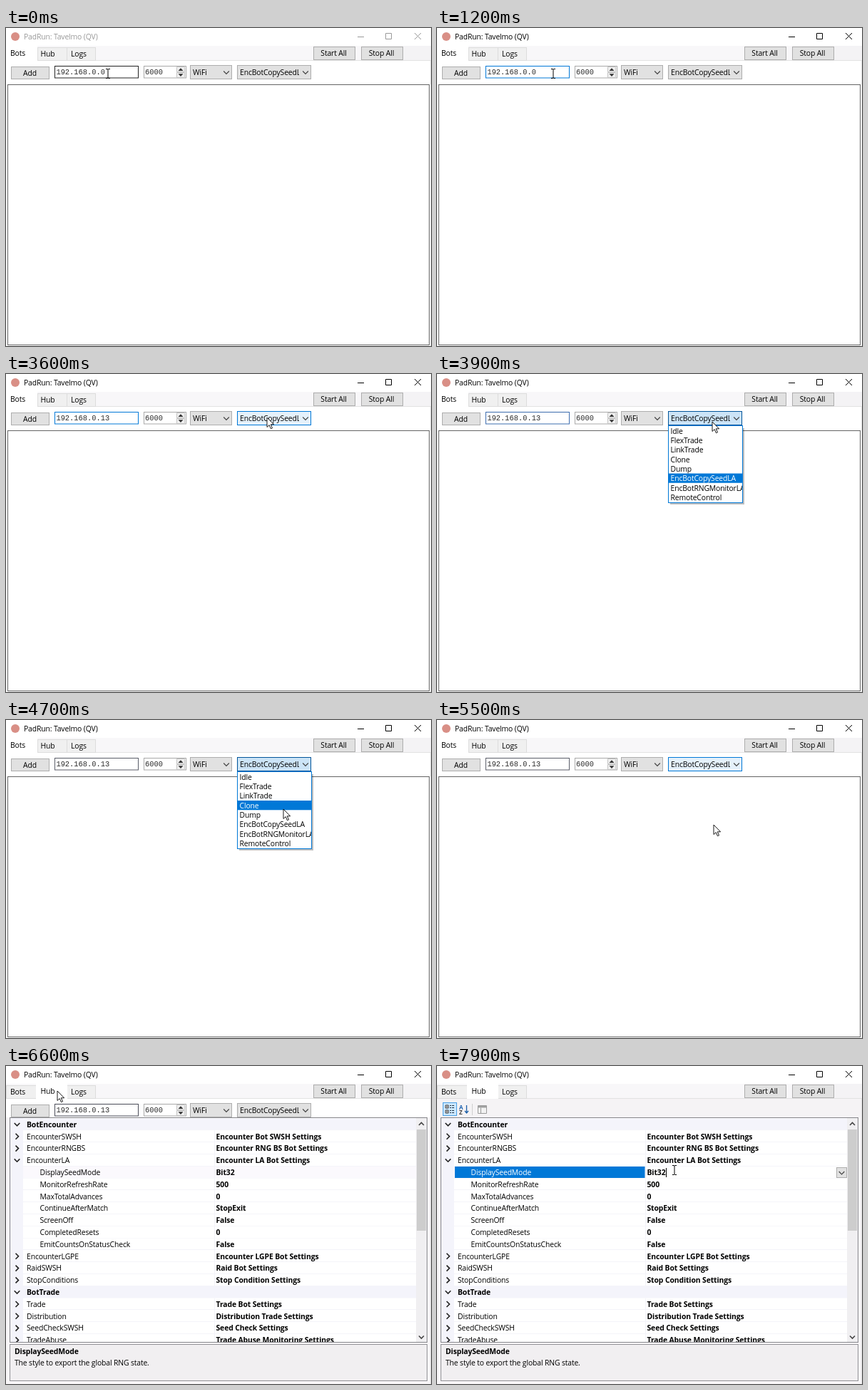
These frames come from a looping animation (596 px wide and 446 px high, 8000 ms). An HTML page:

```html
<!DOCTYPE html>
<html lang="en">
<head>
<meta charset="utf-8">
<title>Bot settings</title>
<style>
html, body { margin: 0; width: 596px; height: 446px; overflow: hidden; background: #fff; }
svg { display: block; }
text { font: 10.4px "Open Sans", "Noto Sans", sans-serif; letter-spacing: -.14px; white-space: pre; }
.b { font-weight: 700; letter-spacing: -.11px; }
.mono { font: 10.4px "Liberation Mono", monospace; letter-spacing: 0; fill: #2a2a2a; }
.mid { text-anchor: middle; }
.btn { fill: #e1e1e1; stroke: #adadad; }
.tab { fill: #f0f0f0; stroke: #dcdcdc; }
.line { fill: none; stroke: #444; stroke-width: 1.2; }
#grid use { stroke-width: 1.5; }

/* every part shares one 8 s clock; 1.25% is a tenth of a second */
.anim { animation: 8s step-end infinite; }

.title { animation-name: wake; color: #000; }
@keyframes wake {
  0% { color: #999; }
  6.25% { color: #999; animation-timing-function: steps(5, start); }
  12.5%, 100% { color: #000; }
}
.field { animation-name: field; fill: #fff; }
@keyframes field {
  0% { stroke: #222; }
  3.75% { stroke: #0078d7; }
  47.5% { stroke: #3c6cae; }
  50% { stroke: #5a5d68; }
  73.75% { stroke: #14141c; }
  77.5% { stroke: #4a4c58; }
}
.old { animation-name: old; }
@keyframes old { 0% { opacity: 1; } 20% { opacity: 0; } }
.one { animation-name: one; }
@keyframes one { 0% { opacity: 0; } 21.25% { opacity: 1; } }
.three { animation-name: three; }
@keyframes three { 0% { opacity: 0; } 25% { opacity: 1; } }
.caret { animation-name: caret; }
@keyframes caret {
  0% { opacity: 0; transform: translateX(138px); }
  3.75% { opacity: 1; transform: translateX(138px); }
  15% { opacity: 0; transform: translateX(138px); }
  20% { opacity: 1; transform: translateX(132px); }
  21.25% { opacity: 1; transform: translateX(138px); }
  25% { opacity: 1; transform: translateX(145px); }
  31.25% { opacity: 0; transform: translateX(145px); }
  37.5% { opacity: 1; transform: translateX(145px); }
  43.75% { opacity: 0; transform: translateX(145px); }
}
.combo { animation-name: combo; }
@keyframes combo {
  0% { fill: #e1e1e1; stroke: #adadad; }
  45% { fill: #e5f1fb; stroke: #0078d7; }
  47.5% { fill: #cce4f7; stroke: #005499; }
  68.75% { fill: #e5f1fb; stroke: #0078d7; }
  70% { fill: #e1e1e1; stroke: #adadad; }
}
.drop { animation-name: drop; }
@keyframes drop { 0% { opacity: 0; } 47.5% { opacity: 1; } 68.75% { opacity: 0; } }
.pick { animation-name: pick; }
@keyframes pick {
  0% { transform: translateY(66.5px); }
  52.5% { transform: none; }
  55% { transform: translateY(13.3px); }
  56.25% { transform: translateY(26.6px); }
  57.5% { transform: translateY(39.9px); }
  60% { transform: translateY(53.2px); }
  61.25% { transform: translateY(66.5px); }
}
.hubtab { animation-name: hubtab; }
@keyframes hubtab { 0% { opacity: 0; } 80% { opacity: 1; } }
.hub { animation-name: hub; }
@keyframes hub { 0% { opacity: 0; } 81.25% { opacity: 1; } }
.tools { animation-name: tools; }
@keyframes tools { 0% { opacity: 0; } 83.75% { opacity: 1; } }
.sel { animation-name: sel; }
@keyframes sel { 0% { opacity: 0; } 97.5% { opacity: 1; } }

.beam { animation-name: beam; }
@keyframes beam {
  0% { opacity: 1; }
  41.25% { opacity: 0; }
  75% { opacity: 1; }
  76.25% { opacity: 0; }
  97.5% { opacity: 1; }
}
.arrow { animation-name: arrow; }
@keyframes arrow {
  0% { opacity: 0; }
  41.25% { opacity: 1; }
  75% { opacity: 0; }
  76.25% { opacity: 1; }
  97.5% { opacity: 0; }
}
.mouse { animation-name: mouse; }
@keyframes mouse {
  0% { transform: translate(143px, 64px); }
  6.25% { transform: translate(143px, 64px); animation-timing-function: steps(5, start); }
  12.5% { transform: translate(163px, 64px); }
  17.5% { transform: translate(163px, 65px); }
  36.25% { transform: translate(164px, 66px); }
  40% { transform: translate(175px, 60px); }
  41.25% { transform: translate(208px, 45px); }
  42.5% { transform: translate(262px, 40px); }
  43.75% { transform: translate(322px, 48px); }
  45% { transform: translate(366px, 61px); }
  46.25% { transform: translate(386px, 67px); }
  52.5% { transform: translate(386px, 67px); animation-timing-function: steps(6, start); }
  60% { transform: translate(389px, 125px); animation-timing-function: steps(3, start); }
  63.75% { transform: translate(388px, 147px); }
  70% { transform: translate(372px, 132px); }
  71.25% { transform: translate(326px, 105px); }
  72.5% { transform: translate(256px, 80px); }
  73.75% { transform: translate(188px, 65px); }
  75% { transform: translate(140px, 57px); }
  76.25% { transform: translate(106px, 47px); }
  77.5% { transform: translate(84px, 39px); }
  78.75% { transform: translate(72px, 35px); }
  87.5% { transform: translate(88px, 46px); }
  88.75% { transform: translate(126px, 70px); }
  90% { transform: translate(180px, 98px); }
  91.25% { transform: translate(240px, 122px); }
  92.5% { transform: translate(290px, 138px); }
  93.75% { transform: translate(320px, 144px); }
  95% { transform: translate(331px, 146px); }
  97.5% { transform: translate(333px, 146px); }
}
</style>
</head>
<body>
<svg width="596" height="446" viewBox="0 0 596 446">
  <defs>
    <path id="down" class="line" d="M-3.8 -2 0 1.8 3.8 -2"/>
    <path id="open" class="line" style="stroke: #222; stroke-width: 1.6" d="M-3.8 -2 0 1.8 3.8 -2"/>
    <path id="shut" class="line" style="stroke: #222; stroke-width: 1.6" d="M-2 -4 2 0 -2 4"/>
    <clipPath id="name"><rect x="326" y="53" width="85" height="18"/></clipPath>
    <clipPath id="list"><rect x="325" y="73" width="103" height="107"/></clipPath>
    <clipPath id="row"><rect class="anim pick" x="325" y="73" width="103" height="13.3"/></clipPath>
    <clipPath id="pane"><rect x="5" y="72" width="587" height="315"/></clipPath>
  </defs>
  <rect width="596" height="446" fill="#fff"/>

  <!-- title bar -->
  <circle cx="13" cy="12" r="6" fill="#d98f86"/>
  <g class="anim title">
    <text x="25" y="16" fill="currentColor">PadRun: Tavelmo (QV)</text>
    <path d="M493 12.5h9M532.5 7.5h8v8h-8zM573 7l9 9M582 7l-9 9" fill="none" stroke="currentColor"/>
  </g>

  <!-- tabs -->
  <rect y="25" width="596" height="20" fill="#f8f7f9"/>
  <rect x="557" y="25" width="39" height="20" fill="#f4f3f5"/>
  <path d="M0 45.5H596" stroke="#e2e2e2"/>
  <rect class="tab" x="44.5" y="27.5" width="41" height="18"/>
  <rect class="tab" x="85.5" y="27.5" width="40" height="18"/>
  <path d="M0 25H44V46H0z" fill="#fff"/>
  <text x="6" y="39">Bots</text>
  <text x="48.5" y="40">Hub</text>
  <text x="91" y="40">Logs</text>
  <g class="anim hubtab">
    <rect y="25" width="86" height="20" fill="#f8f7f9"/>
    <rect class="tab" x="0.5" y="27.5" width="42" height="18"/>
    <path d="M42 25H86V46H42z" fill="#fff"/>
    <text x="6" y="40">Bots</text>
    <text x="48.5" y="39">Hub</text>
  </g>
  <rect class="btn" x="431.5" y="26.5" width="58" height="18"/>
  <text class="mid" x="459.5" y="39">Start All</text>
  <rect class="btn" x="498.5" y="26.5" width="58" height="18"/>
  <text class="mid" x="526.5" y="39">Stop All</text>
  <path d="M595.5 45V446" stroke="#e4e4e4"/>

  <!-- bots page -->
  <rect class="btn" x="7.5" y="54.5" width="53" height="17"/>
  <text class="mid" x="33.5" y="67">Add</text>
  <rect class="anim field" x="68.5" y="53.5" width="117" height="16.5"/>
  <text class="mono" x="70.4" y="65">192.168.0.</text>
  <text class="mono anim old" x="132.8" y="65">0</text>
  <text class="mono anim one" x="132.8" y="65">1</text>
  <text class="mono anim three" x="139" y="65">3</text>
  <rect class="anim caret" y="56" width="1" height="13"/>
  <rect x="193.5" y="53.5" width="59" height="16.5" fill="#fff" stroke="#a8a8a8"/>
  <text class="mono" x="195" y="65">6000</text>
  <path d="M239.5 54.5h11v7h-11zM239.5 62.5h11v7h-11z" fill="#f0f0f0" stroke="#c4c4c4"/>
  <path d="M241.5 60h7L245 56.3zM241.5 64.3h7L245 68z" fill="#333"/>
  <rect class="btn" x="258.5" y="52.5" width="58" height="19"/>
  <text x="262" y="66">WiFi</text>
  <use href="#down" x="309" y="62.5"/>
  <rect class="btn anim combo" x="324.5" y="52.5" width="103" height="19"/>
  <text x="328" y="66" clip-path="url(#name)">EncBotCopySeedLA</text>
  <use href="#down" x="420" y="62.5"/>
  <rect x="2.5" y="79.5" width="591" height="365" fill="#fff" stroke="#646464"/>

  <g class="anim drop">
    <path d="M327 76H431V183H327z" fill="#000" opacity=".25"/>
    <rect x="324.5" y="72.5" width="104" height="108" fill="#fff" stroke="#0078d7"/>
    <g clip-path="url(#list)"><g id="items"></g></g>
    <g clip-path="url(#row)">
      <rect x="325" y="73" width="103" height="107" fill="#0078d7"/>
      <g clip-path="url(#list)"><use href="#items" fill="#fff"/></g>
    </g>
  </g>

  <!-- hub page -->
  <g class="anim hub">
    <path d="M0 72H595V446H0z" fill="#f8f6f8"/>
    <g clip-path="url(#pane)">
      <rect x="5" y="72" width="587" height="315" fill="#fff"/>
      <rect x="6" y="73" width="18" height="314" fill="#f4f4fb"/>
      <g id="grid"></g>
      <rect x="575" y="73" width="15" height="314" fill="#f0eff1"/>
      <rect x="576" y="89" width="13" height="142" fill="#cdcdcd"/>
      <path d="M579 83l3.5-3.5L586 83M579 378.500l3.5 3.5L586 378.500" fill="none" stroke="#444" stroke-width="1.6"/>
    </g>
    <rect x="5.5" y="72.5" width="585" height="315" fill="none" stroke="#85858a"/>
    <rect x="5.5" y="390.5" width="585" height="51" fill="#f1eff1" stroke="#929296"/>
    <text class="b" x="12" y="404">DisplaySeedMode</text>
    <text x="12" y="419.5">The style to export the global RNG state.</text>
    <g class="anim sel">
      <rect x="25" y="141" width="266.5" height="16" fill="#0078d7"/>
      <text x="47.5" y="152.8" fill="#fff">DisplaySeedMode</text>
      <rect x="293" y="141" width="282" height="16" fill="#fff"/>
      <text class="b" x="294.5" y="152.8">Bit32</text>
      <path d="M321.5 143V156" stroke="#000"/>
      <rect class="btn" x="560.5" y="142.5" width="14" height="14"/>
      <use href="#down" x="567.5" y="150"/>
    </g>
  </g>
  <g class="anim tools">
    <rect y="46" width="595" height="26" fill="#f5f3f5"/>
    <rect x="8.5" y="51.5" width="19" height="18" fill="#cce8ff" stroke="#4aa0e6"/>
    <path d="M12 55h4v4h-4zM12 62h4v4h-4z" fill="#fff" stroke="#333"/>
    <path d="M13 57h2M13 64h2" stroke="#222"/>
    <path d="M18 55.5h2M21 55.5h3M18 58.5h2M21 58.5h3M18 62.5h2M21 62.5h3M18 65.5h2M21 65.5h3" stroke="#234"/>
    <text class="b" x="31" y="60.5" style="font-size: 8px" fill="#1c62b0">A</text>
    <text class="b" x="31" y="68" style="font-size: 8px" fill="#444">Z</text>
    <path d="M41.5 55V66M39 63l2.5 3L44 63" fill="none" stroke="#1c5fa8" stroke-width="1.3"/>
    <path d="M49.5 53V69" stroke="#cfcfcf"/>
    <path d="M57.5 55.5h12v11h-12zM61.5 58.5v8" fill="#f2f2f2" stroke="#9a9a9a"/>
    <path d="M58 57h11" stroke="#a0a0a0" stroke-width="3"/>
    <path d="M5 72.5H591" stroke="#85858a"/>
  </g>

  <!-- pointer -->
  <g class="anim mouse">
    <path class="anim beam" d="M-3 -6.5h2.3l.7 .7 .7-.7h2.3M0 -6V6M-3 6.5h2.3l.7-.7 .7 .7h2.3" fill="none" stroke="#000"/>
    <path class="anim arrow" d="M0 0V13.5L3.2 10.6 5.4 15.7 7.5 14.8 5.3 9.8H9.6z" fill="#fff" stroke="#000" stroke-width=".9"/>
  </g>
</svg>
<script>
const byId = id => document.getElementById(id);
const label = (x, y, s, cls = "") => `<text class="${cls}" x="${x}" y="${y}">${s}</text>`;

byId("items").innerHTML =
  ["Idle", "FlexTrade", "LinkTrade", "Clone", "Dump", "EncBotCopySeedLA", "EncBotRNGMonitorLA", "RemoteControl"]
    .map((s, i) => label(327.5, 83.7 + i * 13.3, s)).join("");

// "#" category, ">" closed group, "v" open group, "-" plain setting
const rows = [
  "#BotEncounter",
  ">EncounterSWSH|Encounter Bot SWSH Settings",
  ">EncounterRNGBS|Encounter RNG BS Bot Settings",
  "vEncounterLA|Encounter LA Bot Settings",
  "-DisplaySeedMode|Bit32",
  "-MonitorRefreshRate|500",
  "-MaxTotalAdvances|0",
  "-ContinueAfterMatch|StopExit",
  "-ScreenOff|False",
  "-CompletedResets|0",
  "-EmitCountsOnStatusCheck|False",
  ">EncounterLGPE|Encounter LGPE Bot Settings",
  ">RaidSWSH|Raid Bot Settings",
  ">StopConditions|Stop Condition Settings",
  "#BotTrade",
  ">Trade|Trade Bot Settings",
  ">Distribution|Distribution Trade Settings",
  ">SeedCheckSWSH|Seed Check Settings",
  ">TradeAbuse|Trade Abuse Monitoring Settings"
];
const pitch = 16.8;

byId("grid").innerHTML = rows.map((row, i) => {
  const kind = row[0], [name, value] = row.slice(1).split("|");
  const mid = 82 + i * pitch, top = mid - pitch / 2, base = mid + 3.8;
  const fill = kind === "#" ? "#f4f4fb" : name === "DisplaySeedMode" ? "#fbf9fd" : "#fff";
  let out = `<rect x="24" y="${top}" width="551" height="${pitch}" fill="${fill}"/>`;
  out += `<path d="M24 ${Math.round(top + pitch) - .5}H575" stroke="#f4f4f9"/>`;
  if (kind !== "-") out += `<use href="#${kind === ">" ? "shut" : "open"}" x="15.5" y="${mid}"/>`;
  out += label(kind === "-" ? 47.5 : 29, base, name, kind === "#" ? "b" : "");
  if (value) out += `<path d="M292.5 ${top}v${pitch}" stroke="#f4f4f9"/>` + label(294.5, base, value, "b");
  return out;
}).join("");
</script>
</body>
</html>
```
